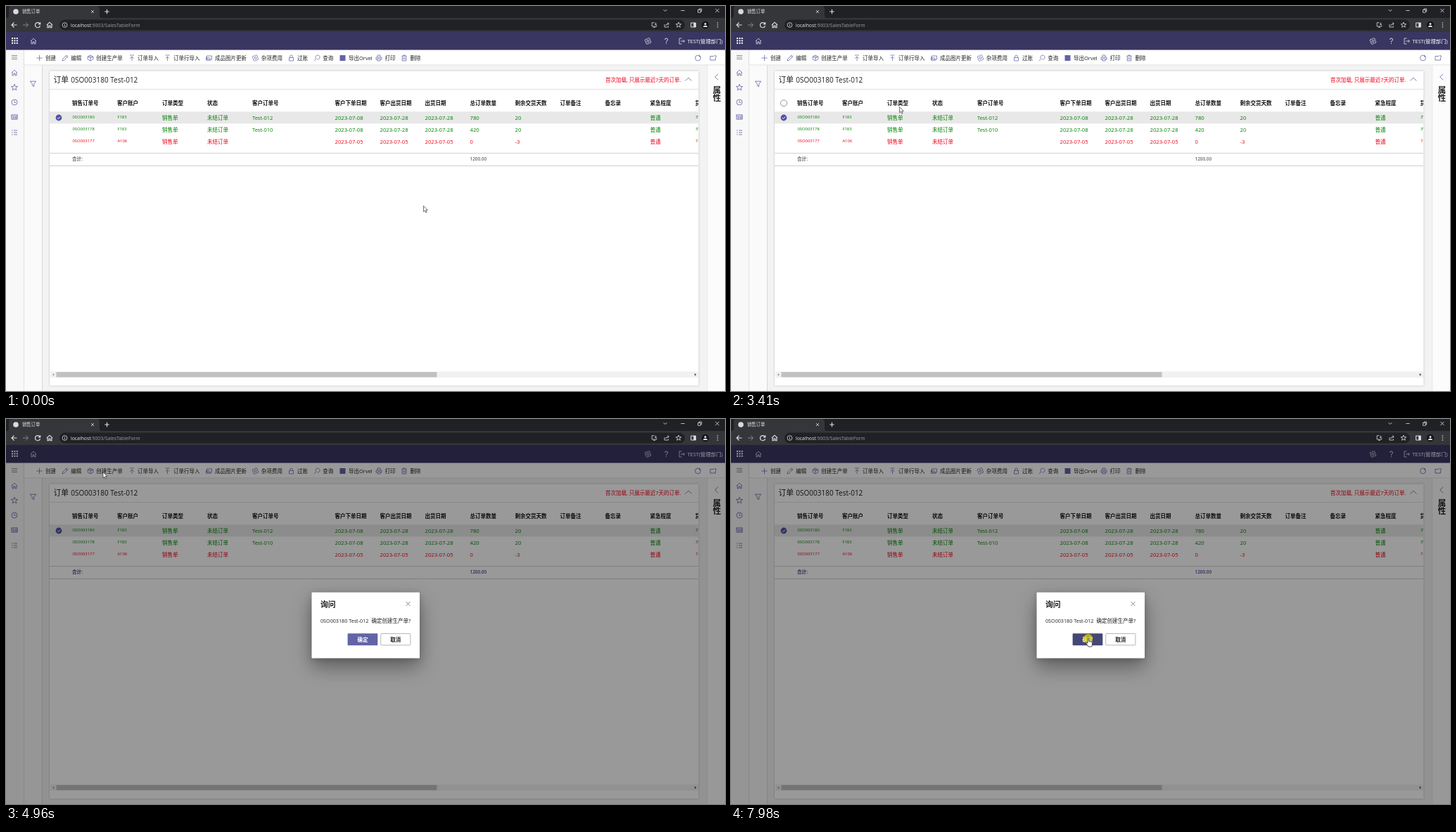
Recreate the animation shown at these times as an HTML page. Size 1022 by 548 pixels, loop 8000 ms.

```html
<!DOCTYPE html>
<html lang="zh-CN">
<head>
<meta charset="utf-8">
<title>销售订单</title>
<style>
html, body { margin: 0; width: 100%; height: 100%; overflow: hidden; background: #f3f3f3; }
svg { display: block; width: 100%; height: 100%; }
text { font-family: "Open Sans", "Noto Sans CJK SC", "Noto Sans CJK", "Noto Sans", sans-serif; white-space: pre; }
</style>
</head>
<body>
<svg id="stage" viewBox="0 0 1022 548"></svg>
<script>
const PURPLE = '#6264a7';
const LOOP = 8000;

// Drawing helpers: each returns SVG markup.
const rect = (x, y, w, h, fill, extra = '') =>
  `<rect x="${x}" y="${y}" width="${w}" height="${h}" fill="${fill}" ${extra}/>`;
const dot = (x, y, r, fill, extra = '') => `<circle cx="${x}" cy="${y}" r="${r}" fill="${fill}" ${extra}/>`;
const text = (x, middle, str, size = 7.5, fill = '#201f1e', extra = '') =>
  `<text x="${x}" y="${middle + size * .37}" font-size="${size}" fill="${fill}" ${extra}>${str}</text>`;
const icon = (x, y, d, color = PURPLE, width = .8) =>
  `<path transform="translate(${x} ${y})" d="${d}" fill="none" stroke="${color}" stroke-width="${width}"/>`;
const bold = 'font-weight="600"';
const centered = 'font-weight="600" text-anchor="middle"';

const ring = r => `M${-r} 0A${r} ${r} 0 1 1 ${r} 0A${r} ${r} 0 1 1 ${-r} 0Z`;
const star = size => 'M' + Array.from({ length: 10 }, (_, i) => {
  const r = i % 2 ? size * .42 : size, a = i * Math.PI / 5;
  return `${(r * Math.sin(a)).toFixed(2)} ${(-r * Math.cos(a)).toFixed(2)}`;
}).join('L') + 'Z';
const gear = ring(1.5) + 'M' + Array.from({ length: 16 }, (_, i) => {
  const r = i % 4 < 2 ? 4.4 : 3.4, a = (i + .5) * Math.PI / 8;
  return `${(r * Math.cos(a)).toFixed(2)} ${(r * Math.sin(a)).toFixed(2)}`;
}).join('L') + 'Z';

const shapes = {
  home: 'M-4 0L0-3.8 4 0M-3-.8V3.8H-1V1H1V3.8H3V-.8',
  cross: 'M-3-3L3 3M3-3L-3 3',
  plus: 'M-4.2 0H4.2M0-4.2V4.2',
  pencil: 'M-4 4L-3.2 1.2 2.2-4 4-2.2-1.3 3.2ZM1-2.8L2.8-1',
  box: 'M-3.8-2L0-4 3.8-2V2L0 4-3.8 2ZM-3.8-2L0 0 3.8-2M0 0V4M-2-3L2-1',
  up: 'M-3-4H3M0 4V-2M-2.6 .6L0-2 2.6 .6',
  image: 'M-3-3H4V2H-3ZM-4-1.5V3.2H3M-3 1L-.5-1 2 2',
  lock: 'M-3-.5H3V4H-3ZM-1.8-.5V-2.2A1.8 1.8 0 0 1 1.8-2.2V-.5',
  search: 'M-1.1 1.1A3 3 0 1 1 .2 1.9M-1.2 1.2L-4.2 4.2',
  printer: 'M-2-1V-4H2V-1M-2 2H-4V-1H4V2H2M-2 1H2V4H-2Z',
  trash: 'M-3.5-2.8H3.5M-1.3-3V-4H1.3V-3M-2.8-2.8V4H2.8V-2.8M-1-1V2.5M1-1V2.5',
  clock: ring(4) + 'M0-2.5V.3H2.2',
  table: 'M-4.2-3.2H4.2V3.2H-4.2ZM-4.2-1.2H4.2M-2.8 .6H0M-2.8 2H0M1.2 .3H3V2H1.2Z',
  list: 'M-4-3H-2.5M-1-3H4M-4 0H-2.5M-1 0H4M-4 3H-2.5M-1 3H4',
  filter: 'M-4.2-3.8H4.2L1.2 0V3.8L-1.2 2.4V0Z',
  menu: 'M-4-2.5H4M-4 0H4M-4 2.5H4',
  refresh: 'M3.4-1.2A3.6 3.6 0 1 0 3.5 1.2M3.7-3.8V-1H1',
  popout: 'M1-2.5H-4V3H3.5V-.5M1.5-3.2H4.2V-.6'
};

const browser = () => {
  const c = '#dfe1e5';
  return rect(0, 0, 1022, 18, '#202124') +
    '<path d="M1 17Q4 17 4 13V4Q4 0 8 0H129Q133 0 133 4V13Q133 17 136 17Z" fill="#35363a"/>' +
    rect(0, 17, 1022, 20, '#35363a') + rect(76, 19.5, 889, 15, '#202124', 'rx="7.5"') +
    dot(14, 8, 3.8, '#d8dade') + text(23, 8, '销售订单', 6.3, '#e8eaed') +
    icon(123, 8, 'M-2-2L2 2M2-2L-2 2', c) + icon(143.5, 8, 'M-3.2 0H3.2M0-3.2V3.2', c, 1.1) +
    icon(937, 6, 'M-2.5-1L0 1.5 2.5-1', c) + icon(962, 6.5, 'M-2.7 0H2.7', c) +
    icon(986, 6.5, 'M-2.5-1H1.3V2.7H-2.5ZM-1-1V-2.5H2.7V1.3H1.3', c) +
    icon(1011, 6.5, 'M-2.6-2.6L2.6 2.6M2.6-2.6L-2.6 2.6', c) +
    icon(11.5, 27, 'M4 0H-3.5M0-3.5L-3.5 0 0 3.5', c, 1.1) +
    icon(28, 27, 'M-4 0H3.5M0-3.5L3.5 0 0 3.5', '#85878b', 1) +
    icon(45, 27, shapes.refresh, c, 1.2) + icon(62, 27, shapes.home, c, 1.1) +
    icon(83.5, 27, ring(3.4) + 'M0-.4V2M0-2V-1.1', c) +
    text(92, 27, 'localhost<tspan fill="#9aa0a6">:9003/SalesTableForm</tspan>', 6.85, '#e8eaed') +
    icon(921.5, 27, 'M0-3.3H-3.3V2H3.3V.5M-1.6 3.3H1.6M2-3.3V0M.5-1.5L2 0 3.5-1.5', c) +
    icon(939, 27, 'M-3-1V3H2.5V1.5M-1.2 1Q-1-1.8 3-1.8M1.3-3.7L3.3-1.8 1.3 0', c) +
    icon(956, 27, star(4), c) + icon(977, 27, 'M-3.3-3H3.3V3H-3.3Z', c, 1) + rect(977.3, 24, 3, 6, c) +
    dot(994, 27, 5.2, '#15161a') + dot(994, 25.5, 1.5, c) + '<path d="M991 30Q991 27.8 994 27.8T997 30Z" fill="#dfe1e5"/>' +
    [24, 27, 30].map(y => dot(1011.5, y, .8, c)).join('');
};

const appHeader = () => {
  let out = rect(0, 37, 1022, 25.5, '#393662');
  for (let i = 0; i < 9; i++) out += rect(8 + i % 3 * 3.4, 45 + Math.floor(i / 3) * 3.4, 2, 2, '#fff');
  return out + icon(39, 50, shapes.home, '#e4e4ef') + icon(912.5, 50, gear, '#fff', .7) +
    icon(938.5, 50, 'M-2-2.2Q-1.8-4 0-4T2-2.2Q2-1 .8-.2Q0 .4 0 1.8M0 3V4', '#fff', .9) +
    icon(960.5, 50, 'M0-4H-3.5V4H0M-1.5 0H4M2-2L4 0 2 2', '#e4e4ef') +
    text(968.5, 50, 'TEST(管理部门)', 7.4, '#fff');
};

// [icon x, icon, label x, label]; an empty icon is a plain square.
const commands = [
  [47.5, 'plus', 56, '创建'], [84, 'pencil', 92.3, '编辑'], [120, 'box', 128.3, '创建生产单'],
  [179, 'up', 187, '订单导入'], [229.5, 'up', 238, '订单行导入'], [288.5, 'image', 297, '成品图片更新'],
  [354.5, 'gear', 363, '杂项费用'], [405.5, 'lock', 414, '过账'], [442, 'search', 450.3, '查询'],
  [478.5, '', 487, '导出Orvel'], [530, 'printer', 538.6, '打印'], [566, 'trash', 574.6, '删除']
];
const commandBar = () => rect(26, 62.5, 996, 21.5, '#fff') +
  rect(111.5, 63, 58.5, 20.5, '#f3f2f1', 'id="commandHover"') +
  commands.map(([ix, name, x, label]) =>
    (name ? icon(ix, 74, name === 'gear' ? gear : shapes[name], PURPLE, .75) : rect(ix - 4, 70, 8, 8, PURPLE)) +
    text(x, 74, label, 7.5, '#201f1e', ix === 120 ? 'id="commandLabel"' : '')).join('') +
  icon(983.5, 74, ring(3.9)) + icon(983.5, 74, 'M2-4.3V-2H4.2') + icon(1005, 74, shapes.popout) +
  rect(26, 83.5, 996, .8, '#dcdcdc');

const sideBars = () => rect(0, 62.5, 25, 486, '#f8f8f8') + rect(25, 62.5, .8, 486, '#d6d6d6') +
  rect(25.8, 84, 25.5, 464, '#fafafa') + rect(51, 84, .8, 464, '#d2d2d2') +
  icon(12, 73, shapes.menu, '#777') + icon(12, 95, shapes.home) + icon(12, 116, star(4.8)) +
  icon(12, 137, shapes.clock) + icon(12, 158, shapes.table) + icon(12, 180, shapes.list) +
  icon(38.5, 111, shapes.filter) +
  rect(996.5, 84, 25.5, 464, '#fcfcfc') + rect(996.5, 84, .7, 464, '#e2e2e2') +
  icon(1010, 101, 'M2.3-4.3L-2.3 0 2.3 4.3') +
  ['属', '性'].map((ch, i) => text(1010.5, 120 + i * 11, ch, 11.5, '#201f1e', centered)).join('');

const columns = [94, 158, 222, 286, 350, 467.5, 531.5, 595.5, 659.5, 723.5, 787.5, 851.5, 915.5, 979.5];
const headings = '销售订单号 客户账户 订单类型 状态 客户订单号 客户下单日期 客户出货日期 出货日期 总订单数量 剩余交货天数 订单备注 备忘录 紧急程度 货'.split(' ');
const orders = [
  ['green', '0SO003180', 'F183', 'Test-012', '07-08', '07-28', '780', '20', '3V'],
  ['green', '0SO003178', 'F183', 'Test-010', '07-08', '07-28', '420', '20', '3V'],
  ['#f00018', '0SO003177', 'A106', '', '07-05', '07-05', '0', '-3', '7-']
];
const orderRow = ([color, id, account, ref, placed, due, amount, days, tail], row) => {
  const y = 159 + row * 17.1, date = d => '2023-' + d;
  const cells = [id, account, '销售单', '未结订单', ref, date(placed), date(due), date(due), amount, days, '', '', '普通', tail];
  return cells.map((cell, i) => {
    const small = i < 2 || i === 13;
    const size = small ? 5.9 : i > 4 && i < 10 ? 7.7 : 7.5;
    return text(columns[i] + (small ? .4 : 0), small ? y - 1.2 : y + .2, cell, size, color);
  }).join('');
};

const card = () => rect(62, 92.5, 922.5, 448, '#fff', 'style="filter:drop-shadow(0 .6px 1.2px #0004)"') +
  text(67.5, 105.5, '订单', 10.8) + text(92.3, 105.5, '0SO003180 Test-012', 10) +
  text(852, 105, '首次加载, 只展示最近7天的订单.', 7.5, '#f00018') +
  icon(970, 104.3, 'M-4.5 2.2L0-2.2 4.5 2.2') +
  rect(62, 118, 922, .8, '#dadada') + rect(62, 150.3, 922, 17, '#e8e8e8', 'id="selectedRow"') +
  '<clipPath id="cardClip"><rect x="62" y="92" width="922" height="448"/></clipPath><g clip-path="url(#cardClip)">' +
  headings.map((h, i) => text(columns[i], 138.5, h, 7.5, '#111', bold)).join('') + orders.map(orderRow).join('') + '</g>' +
  dot(75, 138.3, 4.5, '#fff', 'id="headerCheck" stroke="#666" stroke-width=".7"') +
  dot(75, 159, 4.4, '#4f51a5') + icon(75, 159, 'M-2.1 .1L-.6 1.6 2.2-1.4', '#fff', 1) +
  rect(62, 209.3, 922, .8, '#c4c4c4') + rect(62, 227, 922, .8, '#c4c4c4') +
  `<g id="totals" fill="#666">${text(94, 217.8, '合计:', 6.6, 'inherit', bold)}${text(659.5, 217.5, '1200.00', 6.4, 'inherit', bold)}</g>` +
  rect(63, 520.3, 921, 8.7, '#f1f1f1') + rect(71.5, 521, 541, 7.3, '#c1c1c1') +
  '<path d="M68.2 523V526.4L66.2 524.7Z" fill="#888"/><path d="M978.8 522.8V526.6L981.2 524.7Z" fill="#444"/>';

const dialog = () => '<g id="dialog">' + rect(0, 37, 1022, 511, '#000', 'opacity=".4"') +
  rect(434.5, 246.7, 153.5, 93.8, '#fff', 'rx="1" style="filter:drop-shadow(0 12px 14px #0005) drop-shadow(0 2px 4px #0003)"') +
  text(447, 264, '询问', 10.8, '#201f1e', bold) + icon(571.5, 263, shapes.cross, '#555', .7) +
  text(447, 287.3, '0SO003180 Test-012', 7.2) + text(519.6, 287.3, '确定创建生产单?') +
  rect(485.6, 305.2, 42.7, 17, PURPLE, 'id="okButton" rx=".8"') + text(507, 314, '确定', 7.5, '#fff', centered) +
  rect(532.7, 305.5, 42.2, 16.4, '#fff', 'rx=".8" stroke="#999" stroke-width=".7"') +
  text(553.8, 314, '取消', 7.5, '#201f1e', centered) + '</g>';

const pointer = () => '<g id="pointer">' + dot(-.3, -.1, 6.5, '#e2d800', 'id="clickMark" opacity=".72"') +
  '<path id="arrow" d="M0 0V8.3L1.9 6.6 3.2 9.6 4.6 9 3.3 6.1H5.8Z" fill="#fff" stroke="#111" stroke-width=".6"/>' +
  '<path id="hand" d="M-1 .5C-1-.5 .8-.5 .8 .5V4Q2.4 3.5 2.6 4.5Q4 4.1 4.2 5.2Q5.5 4.9 5.5 6.2V8.5Q5.4 10 4.7 11.6H-.2Q-1 9.6-2.8 7.6Q-4 6-3 5.6Q-2.2 5.4-1 6.8Z" fill="#fff" stroke="#111" stroke-width=".7"/>' +
  '<path id="beam" d="M-1.6-4H1.6M0-4V4M-1.6 4H1.6" fill="none" stroke="#111" stroke-width=".8"/></g>';

document.getElementById('stage').innerHTML = rect(0, 0, 1022, 548, '#f3f3f3') +
  sideBars() + commandBar() + card() + appHeader() + browser() + dialog() + pointer();

const el = id => document.getElementById(id);
const show = (id, on) => el(id).setAttribute('visibility', on ? 'visible' : 'hidden');
const paint = (id, color) => el(id).setAttribute('fill', color);

const moves = [
  { start: 520, end: 1200, steps: 11, to: [263.3, 159.5], lift: 65 },
  { start: 3410, end: 4030, steps: 10, to: [138, 75.5], lift: 0 },
  { start: 5420, end: 5980, steps: 9, to: [503, 293], lift: 0 },
  { start: 6640, end: 6770, steps: 3, to: [508, 312.5], lift: 0 }
];
const clicks = [[1600, 1870], [4760, 4890], [7980, LOOP]];

// The pointer eases out along each move in discrete steps.
function pointerAt(t) {
  let [x, y] = [593.5, 284.5];
  for (const { start, end, steps, to, lift } of moves) {
    if (t < start) break;
    const step = Math.floor((t - start) / (end - start) * (steps - 1) + .15) + 1;
    const eased = 1 - (1 - Math.min(1, step / steps)) ** 2;
    x += (to[0] - x) * eased;
    y += (to[1] - y) * eased - lift * Math.sin(Math.PI * eased);
  }
  return [x, y];
}

function render(t) {
  const [x, y] = pointerAt(t);
  const inside = (x0, y0, x1, y1) => x >= x0 && x <= x1 && y >= y0 && y <= y1;
  const modal = t >= 4960;
  const overCommand = !modal && inside(111, 63, 170, 84);
  const overOk = modal && inside(485, 305, 528, 322);
  const overMessage = modal && inside(447, 282, 576, 294);
  const pressing = overCommand && t >= 4760;

  el('pointer').setAttribute('transform', `translate(${x} ${y})`);
  show('hand', overCommand || overOk);
  show('beam', overMessage);
  show('arrow', !overCommand && !overOk && !overMessage);
  show('clickMark', clicks.some(([from, to]) => t >= from && t < to));
  show('dialog', modal);
  show('headerCheck', !modal && inside(62, 100, 984, 150));
  show('commandHover', overCommand);
  paint('commandHover', pressing ? '#ebebeb' : '#f3f2f1');
  paint('commandLabel', pressing ? '#605e5c' : '#201f1e');
  paint('selectedRow', !modal && inside(62, 150, 984, 167) ? '#d8d8d8' : '#e8e8e8');
  paint('totals', modal ? '#44448c' : '#666');
  paint('okButton', !overOk ? PURPLE : t >= 7980 ? '#464775' : '#585a96');
}

const begin = performance.now();
function tick() {
  render((performance.now() - begin) % LOOP);
  requestAnimationFrame(tick);
}
tick();
</script>
</body>
</html>
```
